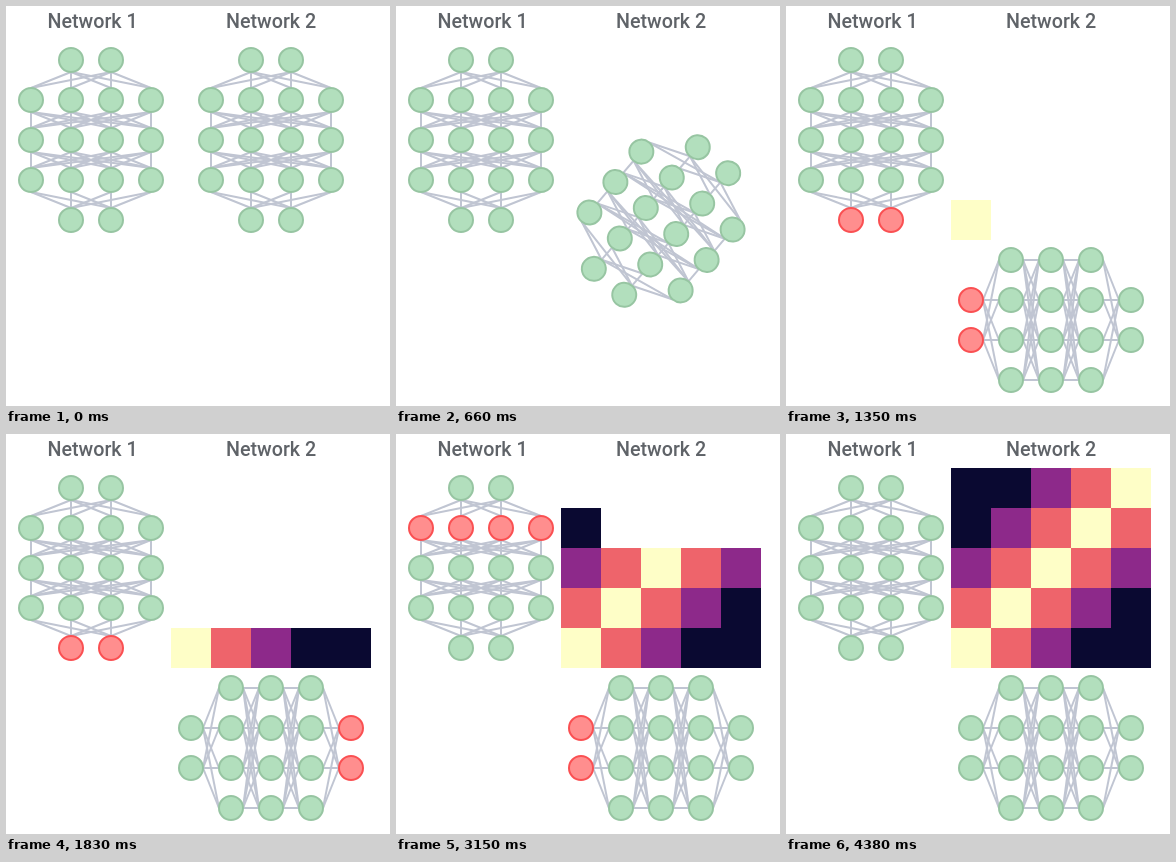
These frames come from a looping animation (384 px wide and 400 px high, 5.4 s). An HTML page:

```html
<!DOCTYPE html>
<html lang="en">
<head>
<meta charset="utf-8">
<title>Layer similarity of two networks</title>
<style>
  html, body { margin: 0; width: 100%; height: 100%; overflow: hidden; background: #fff; }
  svg { display: block; width: 384px; height: 400px; }
  text { font: 500 19.7px Roboto, sans-serif; fill: #5f6368; }
  line { stroke: #c0c5d2; stroke-width: 2; }
  circle { fill: #b2dfbd; stroke: #97c5a2; stroke-width: 2; }
  .on circle { fill: #ff8e8e; stroke: #fa5052; }
  rect { shape-rendering: crispEdges; }
</style>
</head>
<body>
<svg id="stage" viewBox="0 0 384 400">
  <text x="41.5" y="21.5">Network 1</text>
  <text x="220" y="21.5">Network 2</text>
</svg>
<script>
const LOOP = 5400;
const TURN = { start: 480, step: 30, count: 15 };
const SCAN = { start: 1350, step: 120, end: 4380 };
const GAP = 40, RADIUS = 12;
const SIZES = [2, 4, 4, 4, 2];
const HEAT = ['#fefec7', '#ee646b', '#8d298a', '#0a0931', '#0a0931'];
const stage = document.getElementById('stage');

function add(parent, tag, attrs = {}) {
  const el = document.createElementNS('http://www.w3.org/2000/svg', tag);
  for (const key in attrs) el.setAttribute(key, attrs[key]);
  return parent.appendChild(el);
}

const nodeX = (i, size) => (i - (size - 1) / 2) * GAP;
const layerY = layer => (layer - 2) * GAP;

// Builds a network centred on its own origin, with one group per layer.
function makeNetwork() {
  const root = add(stage, 'g');
  for (let l = 0; l < SIZES.length - 1; l++)
    for (let a = 0; a < SIZES[l]; a++)
      for (let b = 0; b < SIZES[l + 1]; b++)
        add(root, 'line', {
          x1: nodeX(a, SIZES[l]), y1: layerY(l) + RADIUS,
          x2: nodeX(b, SIZES[l + 1]), y2: layerY(l + 1) - RADIUS
        });
  const layers = SIZES.map((size, l) => {
    const group = add(root, 'g');
    for (let i = 0; i < size; i++)
      add(group, 'circle', { cx: nodeX(i, size), cy: layerY(l), r: RADIUS });
    return group;
  });
  return { root, layers };
}

const cells = Array.from({ length: 25 }, (_, i) => {
  const row = Math.floor(i / 5), col = i % 5;
  return add(stage, 'rect', {
    x: 165 + col * GAP, y: 194 - row * GAP, width: GAP, height: GAP,
    fill: HEAT[Math.abs(row - col)]
  });
});
const first = makeNetwork(), second = makeNetwork();
first.root.setAttribute('transform', 'translate(85 134)');

function highlight(network, active) {
  network.layers.forEach((group, l) => group.classList.toggle('on', l === active));
}

function render(t) {
  const done = Math.floor((t - TURN.start) / TURN.step) + 1;
  const u = Math.min(Math.max(done / TURN.count, 0), 1);
  const p = u * u * (3 - 2 * u);
  second.root.setAttribute('transform', `translate(265 ${134 + 180 * p}) rotate(${90 * p})`);

  const index = Math.min(Math.floor((t - SCAN.start) / SCAN.step), 24);
  const scanning = index >= 0 && t < SCAN.end;
  cells.forEach((cell, i) => cell.setAttribute('visibility', i <= index ? 'visible' : 'hidden'));
  // Both scans run from the last layer back to the first.
  highlight(first, scanning ? 4 - Math.floor(index / 5) : -1);
  highlight(second, scanning ? 4 - index % 5 : -1);
}

const origin = performance.now();
function tick() {
  render((performance.now() - origin) % LOOP);
  requestAnimationFrame(tick);
}
render(0);
requestAnimationFrame(tick);
</script>
</body>
</html>
```
